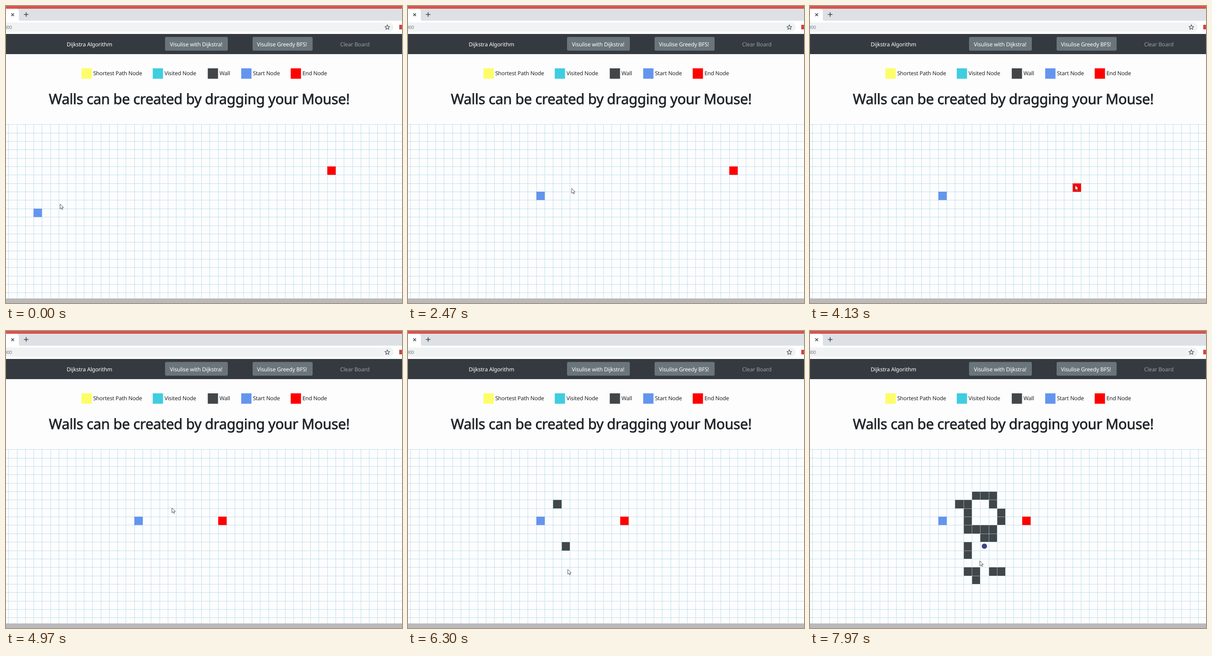
Write an HTML page that moves like this. It is 864 by 648 pixels and loops after 8 s.

```html
<!DOCTYPE html>
<html lang="en">
<head>
<meta charset="utf-8">
<title>Pathfinding board</title>
<style>
  html, body { margin: 0; width: 100%; height: 100%; overflow: hidden; background: #fdfdfe; }
  svg { display: block; width: 100%; height: 100%; }
  text { font: 12px "Noto Sans", "Open Sans", sans-serif; letter-spacing: -.015em; fill: #212529; text-rendering: geometricPrecision; white-space: pre; }
  text.title { font-size: 31px; letter-spacing: -.0108em; stroke: #212529; stroke-width: .75; }
  .nav text { fill: #fff; }
  .nav text.link { fill: #9b9ea1; }
  #grid { fill: none; stroke: #a6d3e5; stroke-dasharray: 2.3 1; }
</style>
</head>
<body>
<svg viewBox="0 0 864 648">
  <rect width="864" height="648" fill="#fdfdfe"/>

  <!-- browser frame -->
  <rect width="864" height="6" fill="#d9534f"/>
  <rect y="6" width="864" height="27" fill="#dde1e5"/>
  <path d="M0 6H22Q28 6 28 13V28Q28 33 33 33H0Z" fill="#fff"/>
  <rect y="32" width="864" height="29" fill="#fff"/>
  <rect x="-20" y="36" width="866" height="20" rx="10" fill="#f0f3f4"/>
  <path d="M11.5 16l6 6m0-6l-6 6M39 18.5h10m-5-5v10" stroke="#3c4043" stroke-width="1.5"/>
  <text x="-3.6" y="50" style="font-size:10px;fill:#777c80">000</text>
  <path id="star" fill="none" stroke="#4b5054" stroke-width="1.2" stroke-linejoin="round"/>
  <rect x="858" y="41" width="10" height="10" fill="#d0453f"/>

  <g class="nav">
    <rect y="61" width="864" height="44" fill="#343a40"/>
    <rect x="347" y="67.5" width="137" height="30" rx="3" fill="#6a757b"/>
    <rect x="538" y="67.5" width="131" height="30" rx="3" fill="#6a757b"/>
    <text x="132.5" y="88">Dijkstra Algorithm</text>
    <text x="357.5" y="87.5">Visulise with Dijkstra!</text>
    <text x="547.5" y="87.5">Visulise Greedy BFS!</text>
    <text class="link" x="729" y="88">Clear Board</text>
  </g>

  <g id="legend"></g>
  <text class="title" x="93.5" y="214">Walls can be created by dragging your Mouse!</text>

  <g id="walls"></g>
  <path id="grid"/>
  <rect id="start" width="18.4" height="18.4" fill="#6495ed"/>
  <rect id="end" width="18.4" height="18.4" fill="#f00"/>
  <rect y="638" width="864" height="10" fill="#bababc"/>
  <path id="cursor" d="M0 0V10.5L2.5 8.3 4.2 12 6 11.2 4.4 7.8H7.6Z" fill="#fff" stroke="#3a3a3e" stroke-width=".9" stroke-linejoin="round"/>
</svg>

<script>
const LOOP = 8000, GROW = 200, TICK = 70, STROKE = 6310;
const CELL_W = 18.3, CELL_H = 18.35, LEFT = 5.25, TOP = 258.3;
const $ = id => document.getElementById(id);

function set(el, attrs) {
  for (const name in attrs) el.setAttribute(name, attrs[name]);
}
function add(parent, tag, attrs, text = '') {
  const el = document.createElementNS('http://www.w3.org/2000/svg', tag);
  set(el, attrs);
  el.textContent = text;
  return parent.appendChild(el);
}

// board geometry
const colX = c => Math.round(LEFT + CELL_W * c);
const rowY = r => Math.round(TOP + CELL_H * r);
const center = ([c, r]) => [LEFT + CELL_W * (c + .5), TOP + CELL_H * (r + .5)];
const cellAt = ([x, y]) => [Math.floor((x - LEFT) / CELL_W), Math.floor((y - TOP) / CELL_H)];

let lines = '';
for (let c = 0; c < 47; c++) lines += `M${colX(c) + .5} 258V638`;
for (let r = 0; r < 21; r++) lines += `M0 ${rowY(r) + .5}H864`;
set($('grid'), { d: lines });

const starPoints = Array.from({ length: 10 }, (_, i) => {
  const a = i * Math.PI / 5, r = i % 2 ? 2.5 : 5.6;
  return [832 + r * Math.sin(a), 46.5 - r * Math.cos(a)];
});
set($('star'), { d: 'M' + starPoints.join('L') + 'Z' });

[
  [165, '#fdfd69', 'Shortest Path Node'],
  [320.5, '#3fcde0', 'Visited Node'],
  [440.5, '#424648', 'Wall'],
  [513.5, '#6495ed', 'Start Node'],
  [621.5, '#f00', 'End Node']
].forEach(([x, fill, label]) => {
  add($('legend'), 'rect', { x: x - .3, y: 136, width: 22.4, height: 22.7, fill });
  add($('legend'), 'text', { x: x + 25.2, y: 150.5 }, label);
});

// the wall drawing, one point per tick in cells: a hook, an oval, a short tail
const oval = Array.from({ length: 14 }, (_, i) => {
  const a = (40 + 27 * i) * Math.PI / 180;
  return [19.82 - 2.1 * Math.sin(a), 7.1 + 2.4 * Math.cos(a)];
});
const stroke = [
  [18.3, 14.2], [19, 15], [19, 14], [21, 14], [22, 14], [18, 12],
  ...oval,
  [20, 10], [21, 10], [21, 9], [20, 11]
].map((cell, i) => ({ cell, time: STROKE + i * TICK }));

// cursor moves: begin, end, x, y
const home = [118, 432];
const moves = [
  [30, 570, 104, 441], [800, 1230, 73, 450],
  [1570, 2300, 287, 415],
  [2440, 2470, 357, 398], [2500, 2630, 644, 316], [2800, 3470, 713, 362],
  [3700, 4500, 472, 414],
  [4530, 4970, 362, 386], [5000, 5270, 324, 377], [5960, 6030, 344, 466],
  ...stroke.map(({ cell, time }) => [time - TICK, time, ...center(cell)]),
  [7920, LOOP, 365, 520]
];

function cursorAt(t) {
  return moves.reduce((pos, [begin, end, ...goal]) => {
    let k = Math.min(1, Math.max(0, (t - begin) / (end - begin)));
    if (end - begin > 100) k = k * k * (3 - 2 * k);
    return pos.map((v, i) => v + (goal[i] - v) * k);
  }, home);
}

// every cell the mouse is caught in becomes a wall, once
const walls = new Map();
[{ cell: [17, 6], time: 5400 }, { cell: [18, 11], time: 6030 }, ...stroke].forEach(({ cell, time }) => {
  const [c, r] = cell.map(Math.round), key = `${c},${r}`;
  if (!walls.has(key)) walls.set(key, { c, r, time, el: add($('walls'), 'rect', {}) });
});

function drawWall({ c, r, time, el }, t) {
  const k = Math.min(1, (t - time) / GROW);
  set(el, { visibility: k < 0 ? 'hidden' : 'visible' });
  if (k < 0) return;
  const scale = 1 - .7 * (1 - k) ** 2;
  const w = (colX(c + 1) - colX(c)) * scale, h = (rowY(r + 1) - rowY(r)) * scale;
  set(el, {
    x: (colX(c) + colX(c + 1) - w) / 2,
    y: (rowY(r) + rowY(r + 1) - h) / 2,
    width: w, height: h,
    rx: w / 2 * Math.min(1, 2 - 2 * k),
    fill: `rgb(${64 + 2 * k},${64 + 6 * k},${150 - 78 * k})`
  });
}

// a node sits in the cell under the cursor while it is dragged
function placeNode(id, t, from, to) {
  const [c, r] = cellAt(cursorAt(Math.min(Math.max(t, from), to)));
  set($(id), { x: colX(c), y: rowY(r) });
}

function frame(now) {
  const t = now % LOOP;
  set($('cursor'), { transform: `translate(${cursorAt(t)})` });
  placeNode('start', t, 1570, 2300);
  placeNode('end', t, 3700, 4500);
  walls.forEach(wall => drawWall(wall, t));
  requestAnimationFrame(frame);
}
frame(0);
</script>
</body>
</html>
```
